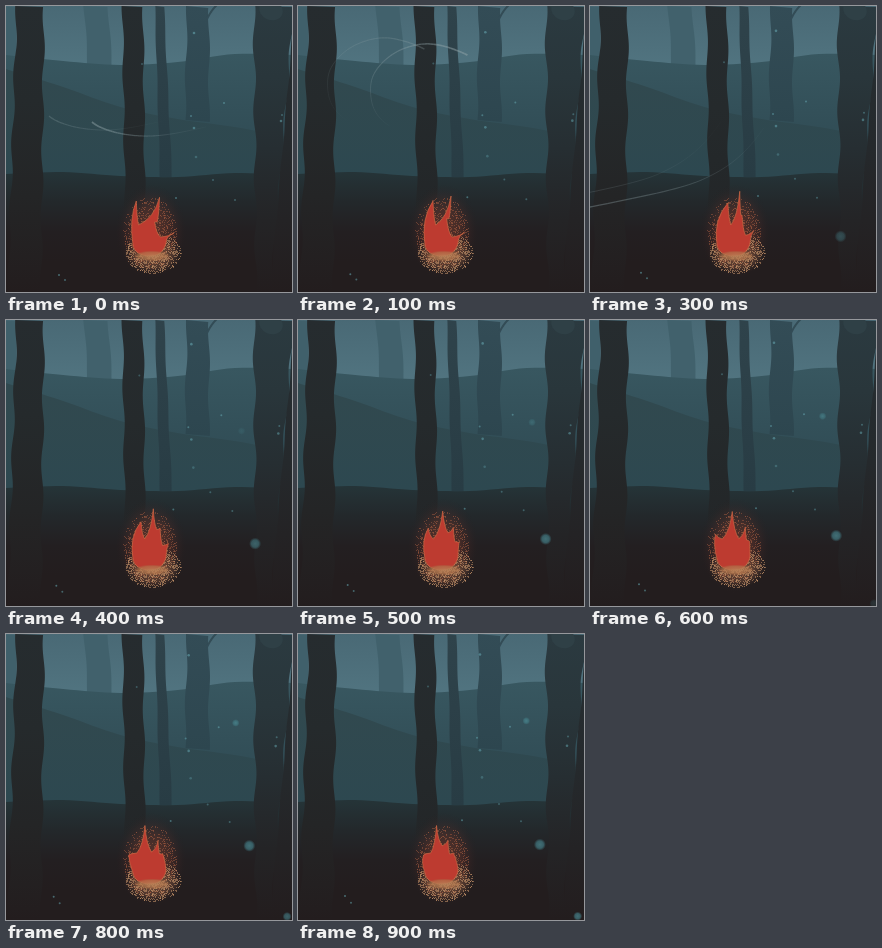
An HTML page with a canvas for the animation above (1000 ms loop, 286 by 286 pixels).

```html
<!DOCTYPE html>
<html lang="en">
<head>
<meta charset="utf-8">
<title>Campfire in a night forest</title>
<style>
html, body { margin: 0; width: 100%; height: 100%; overflow: hidden; background: #231d1e; }
canvas { display: block; width: 100vw; height: 100vh; }
</style>
</head>
<body>
<canvas id="stage"></canvas>
<script>
const SIZE = 286, STEP = 100, STEPS = 10;
const canvas = document.getElementById('stage');
const ratio = window.devicePixelRatio || 1;
canvas.width = canvas.height = Math.round(SIZE * ratio);
const ctx = canvas.getContext('2d');

const lerp = (a, b, t) => a + (b - a) * t;
const clamp = (v, lo, hi) => Math.max(lo, Math.min(hi, v));
const smooth = (a, b, v) => { const t = clamp((v - a) / (b - a), 0, 1); return t * t * (3 - 2 * t); };
const bump = (v, mid, width) => Math.exp(-(((v - mid) / width) ** 2));
const wave = (v, period) => Math.cos(2 * Math.PI * v / period);

function seeded(seed) {
  return () => (seed = (seed * 16807) % 2147483647) / 2147483647;
}

// Point on a Catmull-Rom curve; u counts control points.
function spline(p, u) {
  const last = p.length - 1;
  const i = clamp(Math.floor(u), 0, last - 1), t = u - i;
  return [0, 1].map(k => {
    const [a, b, c, d] = [-1, 0, 1, 2].map(j => p[clamp(i + j, 0, last)][k]);
    return b + t / 2 * (c - a + t * (2 * a - 5 * b + 4 * c - d + t * (3 * (b - c) + d - a)));
  });
}

function fade(c, y0, y1, ...colors) {
  const g = c.createLinearGradient(0, y0, 0, y1);
  colors.forEach((color, i) => g.addColorStop(i / (colors.length - 1), color));
  return g;
}

// Ridge heights are spread evenly over the width.
function hill(c, heights, fill) {
  const ridge = heights.map((y, i) => [SIZE * i / (heights.length - 1), y]);
  c.beginPath();
  for (let u = 0; u <= ridge.length - 1; u += 0.125) c.lineTo(...spline(ridge, u));
  c.lineTo(SIZE, SIZE);
  c.lineTo(0, SIZE);
  c.fillStyle = fill;
  c.fill();
}

// Trunk from top edges [left, right] to bottom edges, with wavy bark.
function trunk(c, top, foot, height, wobble, peak, fill) {
  const edge = (side, y) => lerp(top[side], foot[side], y / height) + wobble * wave(y - peak - side * 8, 67);
  c.beginPath();
  for (let y = 0; y <= height; y += 3) c.lineTo(edge(0, y), y);
  for (let y = height; y >= 0; y -= 3) c.lineTo(edge(1, y), y);
  c.fillStyle = fill;
  c.fill();
}

function glow(c, x, y, rx, ry, stops) {
  c.save();
  c.translate(x, y);
  c.scale(rx, ry);
  const g = c.createRadialGradient(0, 0, 0, 0, 0, 1);
  stops.forEach(([at, color]) => g.addColorStop(at, color));
  c.fillStyle = g;
  c.fillRect(-1, -1, 2, 2);
  c.restore();
}

// Fine embers scattered over an ellipse, thinning towards its rim.
function embers(c, x, y, rx, ry, count, color, random) {
  c.fillStyle = color;
  for (let i = 0; i < count; i++) {
    const angle = random() * 2 * Math.PI, r = random() ** 0.6;
    c.fillRect(Math.round(x + rx * r * Math.cos(angle)), Math.round(y + ry * r * Math.sin(angle)), 1, 1);
  }
}

function paintForest() {
  const layer = document.createElement('canvas');
  layer.width = layer.height = canvas.width;
  const c = layer.getContext('2d');
  c.scale(ratio, ratio);

  c.fillStyle = fade(c, 0, 60, '#496975', '#517480');
  c.fillRect(0, 0, SIZE, SIZE);
  trunk(c, [-9, 10], [-9, 10], 70, 0, 0, '#40606b');
  trunk(c, [78, 102], [82, 106], 64, 0.7, 30, '#41616c');
  hill(c, [49, 55, 59, 56, 48, 49], fade(c, 48, 130, '#385760', '#314d56'));
  trunk(c, [181, 203], [179, 203], 116, 1, 35, fade(c, 0, 117, '#334c56', '#2d464f'));
  c.beginPath();
  c.moveTo(201, 13);
  c.quadraticCurveTo(206, 3, 211, -1);
  c.strokeStyle = '#334c56';
  c.lineWidth = 2;
  c.stroke();
  hill(c, [63, 81, 101, 113, 121, 132], fade(c, 75, 170, '#31494f', '#2d4850'));
  trunk(c, [149, 158], [154, 166], 172, 0.4, 70, fade(c, 0, 172, '#2f434b', '#283c44'));
  hill(c, [168, 166, 170, 171, 167, 169],
    fade(c, 166, SIZE, '#253438', '#23282b', '#231f21', '#231d1e', '#231d1e'));

  trunk(c, [248, 288], [250, 265], SIZE, 1.5, 5,
    fade(c, 0, SIZE, '#2b3a40', '#29363b', '#262e32', '#242426', '#231d1e'));
  c.fillStyle = '#2f4046';
  c.beginPath();
  c.ellipse(265, 4, 12, 10, 0.4, 0, 7);
  c.fill();
  trunk(c, [289, 310], [264, 310], SIZE, 0.5, 0, fade(c, 0, SIZE, '#262f33', '#25292c', '#231d1e'));

  trunk(c, [10.5, 38], [2, 35], SIZE, 1.3, 35, fade(c, 0, SIZE, '#262c2f', '#252a2c', '#242526', '#231d1e'));
  trunk(c, [116.5, 137], [119, 139], 205, 1, 35, fade(c, 0, 205, '#262c2f', '#252a2c', '#232628'));

  const random = seeded(41);
  glow(c, 145, 226, 36, 48, [[0, '#8a443188'], [0.5, '#75392c66'], [0.75, '#4e2b2838'], [1, '#231d1e00']]);
  glow(c, 147, 248, 29, 20, [[0, '#a8744f88'], [0.7, '#8a5c4255'], [1, '#4a302800']]);
  embers(c, 144, 227, 27, 36, 800, '#a05a4088', random);
  embers(c, 147, 247, 28, 20, 900, '#c0906899', random);
  return layer;
}

// Flame tips sway and stretch; each dip hangs between its neighbours.
function flameAt(s) {
  const tips = [
    [130.3 + 8 * wave(s - 2.5, 10), lerp(195, 221, smooth(2, 8, s))],
    [146 + 7.5 * wave(s, 18), 191.5 - 6.5 * bump(s, 2.7, 1.4)],
    [152 + 3.5 * wave(s - 5.5, 10), 206 + 10 * Math.exp(-s / 2.5)],
    [168 - 1.4 * s, 227 - 0.9 * s]
  ];
  const between = (i, t) => lerp(tips[i][0], tips[i + 1][0], t);
  const dips = [
    [between(0, 0.1 + 0.05 * s), 219],
    [between(1, 0.5), tips[2][1] + 15 * bump(s, 7, 2)],
    [between(2, 0.3), 231 - 11 * smooth(2, 6, s)]
  ];
  return { tips, dips };
}

function drawFlame(step) {
  const { tips, dips } = flameAt(step);
  const bend = (tip, dip, to) =>
    ctx.quadraticCurveTo(lerp(dip[0], tip[0], 0.75), lerp(dip[1], tip[1], 0.25), ...to);
  ctx.beginPath();
  ctx.moveTo(127, 239);
  ctx.quadraticCurveTo(123, lerp(239, tips[0][1], 0.6), ...tips[0]);
  dips.forEach((dip, i) => {
    bend(tips[i], dip, dip);
    bend(tips[i + 1], dip, tips[i + 1]);
  });
  ctx.quadraticCurveTo(160, 230, 160, 237);
  ctx.bezierCurveTo(158, 246, 151, 250, 144, 250);
  ctx.bezierCurveTo(135, 250, 128, 246, 127, 239);
  ctx.fillStyle = '#bd3b30';
  ctx.fill();
  ctx.strokeStyle = '#cf6b47bb';
  ctx.lineWidth = 0.9;
  ctx.lineJoin = 'round';
  ctx.stroke();
  glow(ctx, 146, 250, 19, 5.5, [[0, '#b98258dd'], [0.7, '#b0754caa'], [1, '#a06a4700']]);
}

// The wind runs along one loop, followed by a fainter shifted copy.
const WIND = [
  [200, 121], [165, 128], [137, 130], [108, 126], [86, 116], [74, 97], [75, 70], [95, 48], [125, 38],
  [155, 43], [181, 58], [188, 85], [178, 115], [152, 148], [120, 170], [80, 184], [0, 201], [-60, 212]
];

function drawGust(step, dx, dy, alpha, width) {
  const head = Math.min(4 + 5.5 * step, WIND.length), tail = Math.max(0, head - 5.8);
  const parts = 60;
  ctx.save();
  ctx.translate(dx, dy);
  ctx.strokeStyle = '#93a6aa';
  for (let i = 0; i < parts; i++) {
    const k = (i + 1) / parts;
    ctx.globalAlpha = alpha * Math.min(1, 0.1 + k);
    ctx.lineWidth = lerp(0.5, width, k);
    ctx.beginPath();
    ctx.moveTo(...spline(WIND, Math.min(lerp(tail, head, i / parts), WIND.length - 1)));
    ctx.lineTo(...spline(WIND, Math.min(lerp(tail, head, k), WIND.length - 1)));
    ctx.stroke();
  }
  ctx.restore();
}

const MOTES = [
  [190, 151], [207, 174], [170, 192], [229, 194], [188, 122], [185, 110], [218, 97],
  [276, 109], [275, 115], [59, 274], [53, 269], [136, 58], [188, 27]
];

function drawMotes(step) {
  const random = seeded(7), k = step / 9;
  ctx.fillStyle = '#65a6b0';
  MOTES.forEach(([x, y], i) => {
    ctx.globalAlpha = 0.35 + 0.25 * random();
    ctx.beginPath();
    ctx.arc(x - 6 * k, y - (3 + 5 * random()) * k, i % 4 ? 1 : 1.3, 0, 7);
    ctx.fill();
  });
  ctx.globalAlpha = 1;
}

// A soft light that appears, rises quickly and then slows down.
function drawOrb(age, x, y, rise, r) {
  if (age < 0) return;
  ctx.globalAlpha = Math.min(0.7, 0.2 + age * 0.2);
  glow(ctx, x - 1.45 * age, y - rise * (1 - Math.exp(-age / 2.8)), r, r,
    [[0, '#4f8f98'], [0.6, '#417881'], [1, '#41788100']]);
  ctx.globalAlpha = 1;
}

const forest = paintForest();
let shown = -1;

function draw(step) {
  ctx.setTransform(1, 0, 0, 1, 0, 0);
  ctx.drawImage(forest, 0, 0);
  ctx.scale(ratio, ratio);
  if (step < 4) {
    drawGust(step, 0, 0, 0.5, 1.8);
    drawGust(step, -43, -6, 0.28, 1.4);
  }
  drawMotes(step);
  drawOrb(step - 2, 252, 240, 32, 6);
  drawOrb(step - 4, 235.5, 111, 29, 3.8);
  drawOrb(step - 6, 284, 283.5, 2, 4.5);
  drawFlame(step);
}

const start = performance.now();
function tick() {
  const step = Math.floor((performance.now() - start) / STEP) % STEPS;
  if (step !== shown) draw(shown = step);
  requestAnimationFrame(tick);
}
tick();
</script>
</body>
</html>
```
